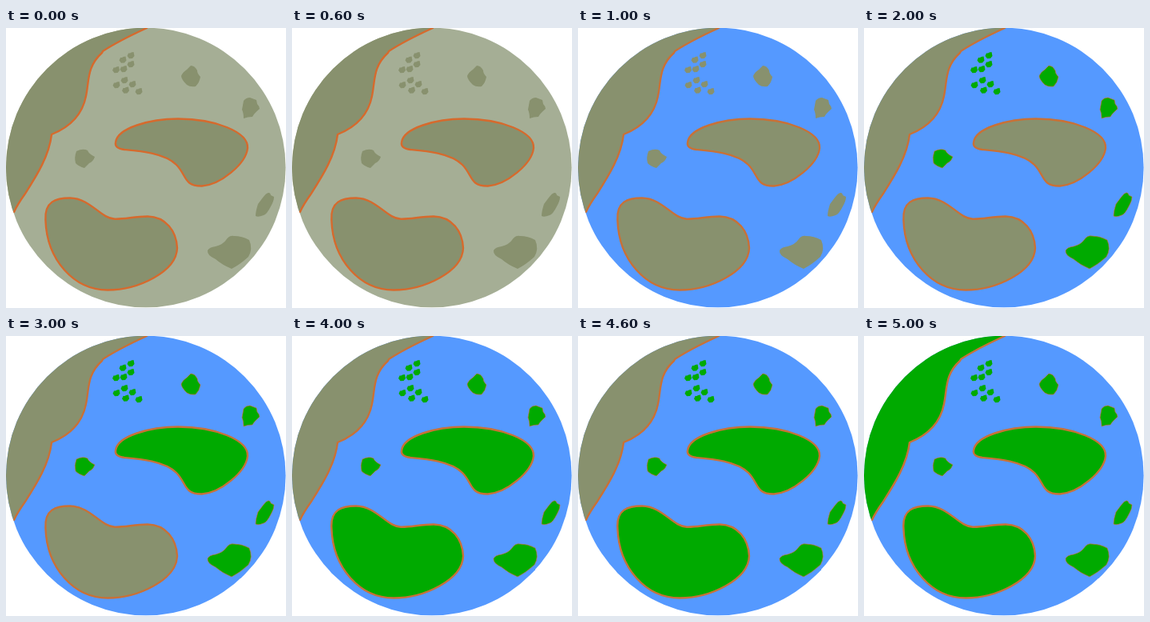
An HTML page for the animation above (6 s loop, 350 by 350 pixels).

```html
<!DOCTYPE html>
<html lang="en">
<head>
<meta charset="utf-8">
<title>Planet colouring</title>
<style>
  html, body { margin: 0; width: 100%; height: 100%; overflow: hidden; background: #fff; }
  svg { display: block; width: 100vw; height: 100vh; }

  .sea, .land, .coast { animation: 6s step-end infinite; }
  .sea { animation-name: sea; }
  .land { fill: #88916e; stroke-linejoin: round; }
  .coast { fill: none; stroke-width: 2.4; stroke-linejoin: round; animation-name: coast; }
  .islets { animation-name: islets; }
  .middle { animation-name: middle; }
  .south { animation-name: south; }
  .west { animation-name: west; }

  @keyframes sea { 0% { fill: #a5ae95; } 16.6667%, 100% { fill: #5599ff; } }
  @keyframes coast { 0% { stroke: #d66a2d; } 16.6667%, 100% { stroke: #c87137; } }
  @keyframes islets {
    0% { fill: #88916e; stroke: none; }
    33.3333%, 100% { fill: #00aa00; stroke: #c87137; }
  }
  @keyframes middle { 0% { fill: #88916e; } 50%, 100% { fill: #00aa00; } }
  @keyframes south { 0% { fill: #88916e; } 66.6667%, 100% { fill: #00aa00; } }
  @keyframes west { 0% { fill: #88916e; } 83.3333%, 100% { fill: #00aa00; } }
</style>
</head>
<body>
<svg viewBox="0 0 350 350">
  <defs>
    <clipPath id="globe"><circle cx="174.8" cy="174.5" r="174.8"/></clipPath>
    <path id="west" d="M176 0Q141 16 121 29C120 30 121 30 120 31C101 48 104 66 100 85C95 111 77 125 57 133C54 160 38 185 24 207Q14 221 10 230L-9 231V-9H176Z"/>
    <path id="middle" d="M137 143C139 125 180 113.5 215 113.5C262 113.5 303 130 302 150C300 170 268 196 245 197.5C222 198 226 184 213 171C198 156 165 153.5 148 152C140 151 136 148 137 143Z"/>
    <path id="south" d="M49.4 240C48 217 62 212.5 80 212.5C106 213 118 238 136 238.7C150 239 160 235.5 177 235.5C200 236 213 254 214 275C213 305 165 327.5 127 327.5C85 327.5 51 290 49.4 240Z"/>
    <path id="rock" d="M-3-2.5L-1-2.5Q0-4 3.5-4L4.5 1L2 4L-2 4.2L-4.5 1Z"/>
  </defs>
  <g clip-path="url(#globe)">
    <rect class="sea" width="350" height="350"/>
    <use class="land west" href="#west"/>
    <use class="land middle" href="#middle"/>
    <use class="land south" href="#south"/>
    <g class="coast">
      <use href="#west"/>
      <use href="#middle"/>
      <use href="#south"/>
    </g>
    <g class="land islets" stroke-width=".7">
      <path d="M231 47Q236 47 239 53Q239 57 243 61Q242 68 237 73Q230 74 226 71Q219 64 219 60Q221 55 226 52Z"/>
      <path d="M297 91Q300 87 305 87L313 90L314 95Q317 98 317 101Q310 107 308 111Q302 111 297 113Q297 106 295 102Z"/>
      <path d="M88 154Q96 150 102 153Q103 157 111 161Q109 167 104 169L98 175Q91 173 87 169Q85 162 88 154Z"/>
      <path d="M321 212Q326 205 329 206Q331 207 331 209L335 211Q335 216 331 223Q326 233 322 234Q315 237 312 235Q312 229 315 220Z"/>
      <path d="M252 278Q254 274 262 273Q272 270 275 265Q279 259 285 260Q295 260 304 265Q309 276 303 286Q292 296 282 301Q270 296 262 289Q251 284 252 278Z"/>
      <g stroke="none">
        <use href="#rock" x="156" y="34"/>
        <use href="#rock" x="146" y="39.5"/>
        <use href="#rock" x="156" y="45"/>
        <use href="#rock" x="147" y="51"/>
        <use href="#rock" x="137.5" y="52"/>
        <use href="#rock" x="148" y="65"/>
        <use href="#rock" x="138" y="71"/>
        <use href="#rock" x="158" y="70"/>
        <use href="#rock" x="149.5" y="77.5"/>
        <use href="#rock" x="166" y="79"/>
      </g>
    </g>
  </g>
</svg>
</body>
</html>
```
